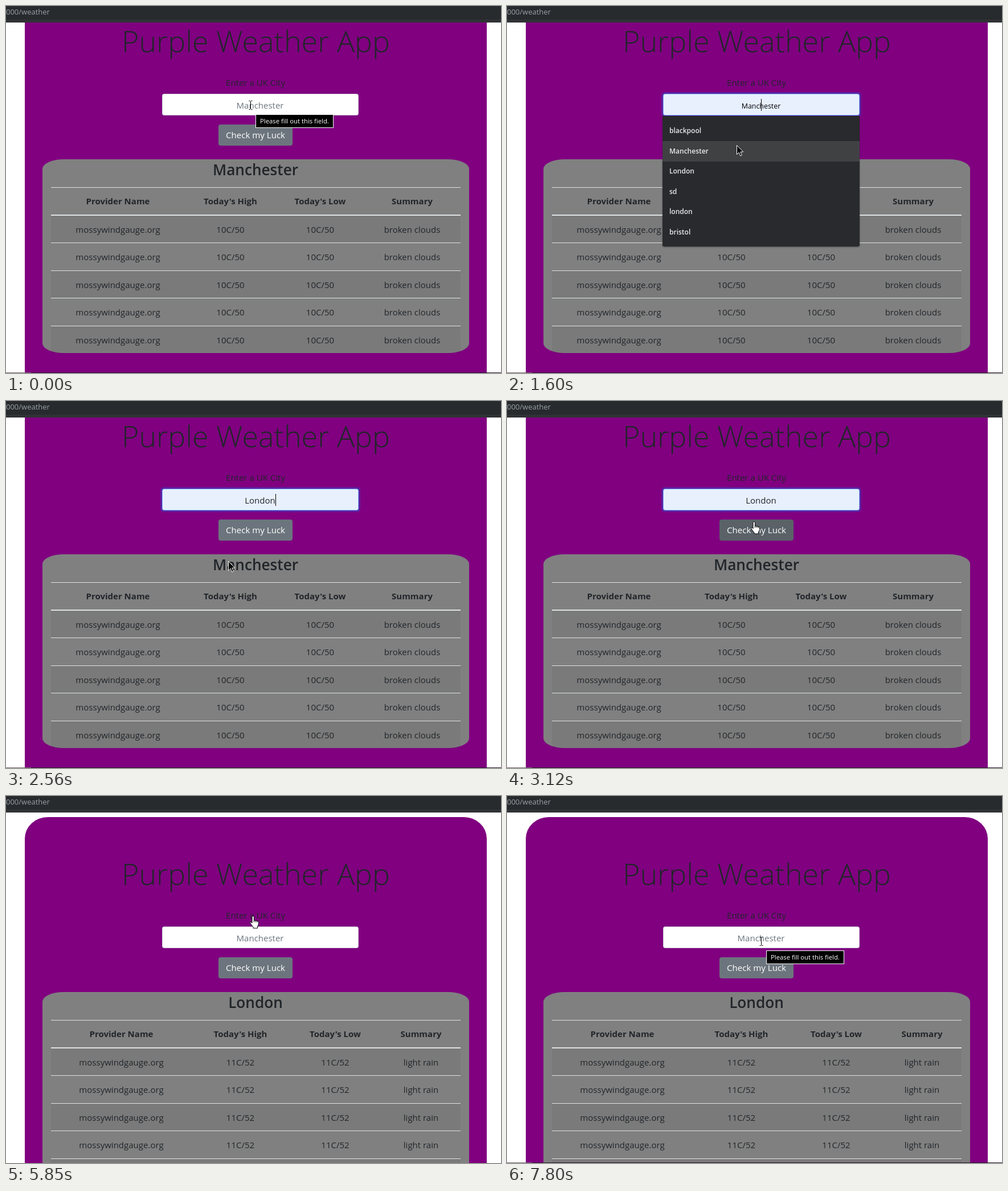
Animation of 869x644 px, one loop 8 s. Source, as an HTML page with a canvas:

```html
<!DOCTYPE html>
<html lang="en">
<head>
<meta charset="utf-8">
<title>Purple Weather App</title>
<style>
  html, body { margin: 0; width: 100%; height: 100%; overflow: hidden; background: #fff; }
  canvas { display: block; }
</style>
</head>
<body>
<canvas id="stage" width="869" height="644"></canvas>
<script>
const ctx = document.getElementById('stage').getContext('2d');
const LOOP = 8000;
const INK = '#212529', MUTED = '#6c757d', LINE = '#dee2e6', PURPLE = '#800080';
const SUGGESTIONS = ['blackpool', 'Manchester', 'London', 'sd', 'london', 'bristol'];
const PROVIDER = 'mossywindgauge.org';
const REPORTS = {
  Manchester: { columns: [196.5, 394, 551.5, 713], cells: [PROVIDER, '10C/50', '10C/50', 'broken clouds'] },
  London: { columns: [202.5, 411.5, 578, 728.5], cells: [PROVIDER, '11C/52', '11C/52', 'light rain'] }
};

// Each entry overrides part of the state from its time (ms) onward.
const TIMELINE = [
  [0, { city: 'Manchester', scroll: 75, edge: true, cursor: ['beam', 429, 174], tooltip: [438, 190],
        focus: '', menu: false, hover: -1, value: '', caret: 0, hot: false }],
  [500, { tooltip: null }],
  [650, { focus: 'input', menu: true, caret: 446 }],
  [1050, { caret: 0 }],
  [1320, { cursor: ['arrow', 424, 206], hover: 0 }],
  [1450, { cursor: ['arrow', 416, 216], caret: 446 }],
  [1600, { cursor: ['arrow', 403, 244], hover: 1 }],
  [1730, { cursor: ['arrow', 396, 262] }],
  [1850, { cursor: ['arrow', 391, 279], hover: 2 }],
  [2000, { cursor: ['arrow', 390, 281], caret: 0 }],
  [2560, { menu: false, hover: -1, value: 'London', caret: 473 }],
  [3000, { cursor: ['arrow', 418, 248], caret: 0 }],
  [3120, { cursor: ['hand', 428, 211], hot: true }],
  [3550, { caret: 473 }],
  [3680, { focus: 'button', caret: 0 }],
  [3830, { cursor: ['hand', 428, 210] }],
  [5850, { city: 'London', scroll: 0, edge: false, focus: '', hot: false, value: '' }],
  [6960, { edge: true }],
  [7260, { cursor: ['beam', 435, 243] }],
  [7410, { cursor: ['beam', 440, 249] }],
  [7540, { cursor: ['beam', 444, 253] }],
  [7670, { cursor: ['beam', 446, 255] }],
  [7800, { tooltip: [455, 271] }]
];

function stateAt(time) {
  return Object.assign({}, ...TIMELINE.filter(([start]) => start <= time).map(([, change]) => change));
}

function rect(x, y, w, h, color) {
  ctx.fillStyle = color;
  ctx.fillRect(x, y, w, h);
}

function rounded(x, y, w, h, radius, color) {
  ctx.fillStyle = color;
  ctx.beginPath();
  ctx.roundRect(x, y, w, h, radius);
  ctx.fill();
}

function text(string, x, y, size, color = INK, weight = 400, align = 'center') {
  ctx.font = `${weight} ${size}px "Open Sans", "Noto Sans", sans-serif`;
  ctx.textAlign = align;
  ctx.fillStyle = color;
  ctx.fillText(string, x, y);
}

function drawInput({ focus, hover, value, caret }) {
  const focused = focus === 'input';
  const preview = SUGGESTIONS[hover];
  if (focused) rounded(271, 151, 351, 44, 6, 'rgba(0,123,255,.25)');
  rounded(274, 154, 345, 38, 4, focused ? '#80bdff' : '#ced4da');
  rounded(275, 155, 343, 36, 3, preview || value ? '#e8f0fe' : '#fff');
  if (preview) text(preview, 446, 180, 12.4, '#000');
  else if (value) text(value, 446, 180, 15, INK);
  else text('Manchester', 446, 180, 15, MUTED);
  if (caret) rect(caret, 163, 1, 21, '#000');
}

function drawButton({ focus, hot }) {
  if (focus === 'button') rounded(370, 205, 136, 43, 6, 'rgba(130,138,145,.5)');
  rounded(373, 208, 130, 37, 4, hot ? '#5a6268' : MUTED);
  text('Check my Luck', 438, 232, 15.1, '#fff');
}

function drawReport(city) {
  const { columns, cells } = REPORTS[city];
  const headers = ['Provider Name', "Today's High", "Today's Low", 'Summary'];
  rounded(64, 269, 749, 340, { x: 37.4, y: 17 }, '#808080');
  text(city, 438, 297, 26.2, INK, 600);
  rect(79, 318, 719, 1, LINE);
  columns.forEach((x, i) => text(headers[i], x, 348, 15, INK, 700));
  for (let row = 0; row < 5; row++) {
    const y = Math.floor(367 + 48.5 * row);
    if (row % 2 === 0) rect(79, y, 719, 48, 'rgba(0,0,0,.05)');
    rect(79, row ? y : 366, 719, row ? 1 : 2, LINE);
    columns.forEach((x, i) => text(cells[i], x, Math.round(397.5 + 48.5 * row), 15));
  }
}

function drawMenu(hover) {
  ctx.save();
  ctx.shadowColor = 'rgba(0,0,0,.4)';
  ctx.shadowBlur = 3;
  ctx.shadowOffsetY = 1;
  rounded(273, 193, 346, 229, [0, 0, 3, 3], '#292a2d');
  ctx.restore();
  SUGGESTIONS.forEach((name, i) => {
    const middle = 219 + 35.6 * i;
    if (i === hover) rect(273, Math.round(middle - 18), 346, 36, '#404143');
    text(name, 285, Math.round(middle + 4), 12, '#e8eaed', 600, 'left');
  });
}

function drawTooltip([x, y]) {
  rect(x, y, 137, 24, '#fff');
  rect(x + 1, y + 1, 135, 22, '#000');
  text('Please fill out this field.', x + 8, y + 16, 11.3, '#fff', 400, 'left');
}

const CURSORS = {
  beam: { path: new Path2D('M-3 -7.5H-1L0 -6.5L1 -7.5H3M0 -6.5V6.5M-3 7.5H-1L0 6.5L1 7.5H3') },
  arrow: { path: new Path2D('M.5 .5V16.5L4.2 13L6.8 19L9.4 17.8L6.8 12H11.8Z'), fill: '#000', stroke: '#fff' },
  hand: {
    path: new Path2D('M4 13V2.4a1.7 1.7 0 0 1 3.4 0V8l5.6 1.2c1.7.4 2.5 1.2 2.5 2.9 0 3.5-.8 5-2 7V22H6v-2' +
      'C4 17.5 2.5 15.5 .8 13c-.9-1.7 .8-2.6 2-1.5z M7.4 8v3.5M10.2 8.6v3M13 9.2v2.6'),
    fill: '#fff', stroke: '#000'
  }
};

function drawCursor([kind, x, y]) {
  const { path, fill, stroke } = CURSORS[kind];
  ctx.save();
  ctx.translate(x, y);
  ctx.lineWidth = 1;
  if (fill) {
    ctx.fillStyle = fill;
    ctx.fill(path);
    ctx.strokeStyle = stroke;
  } else {
    ctx.translate(0.5, 0);
    ctx.strokeStyle = '#000';
  }
  ctx.stroke(path);
  ctx.restore();
}

function drawFrame(state) {
  rect(0, 0, 869, 644, '#fff');
  ctx.save();
  ctx.translate(0, 75 - state.scroll);
  rounded(33, -38, 811, 750, { x: 40.5, y: 37.5 }, PURPLE);
  text('Purple Weather App', 438.5, 81, 52, INK, 300);
  text('Enter a UK City', 438, 140, 15.05);
  drawInput(state);
  drawButton(state);
  drawReport(state.city);
  if (state.menu) drawMenu(state.hover);
  ctx.restore();

  rect(0, 0, 869, 29, '#272b2e');
  rect(0, 24, 869, 5, '#303336');
  text('000/weather', 0, 15, 13, '#9aa0a6', 400, 'left');
  if (state.edge) {
    rect(0, 643, 869, 1, '#2b1a2e');
    rect(0, 643, 44, 1, '#75636a');
  }
  if (state.tooltip) drawTooltip(state.tooltip);
  drawCursor(state.cursor);
}

function tick(now) {
  drawFrame(stateAt(now % LOOP));
  requestAnimationFrame(tick);
}
requestAnimationFrame(tick);
</script>
</body>
</html>
```
